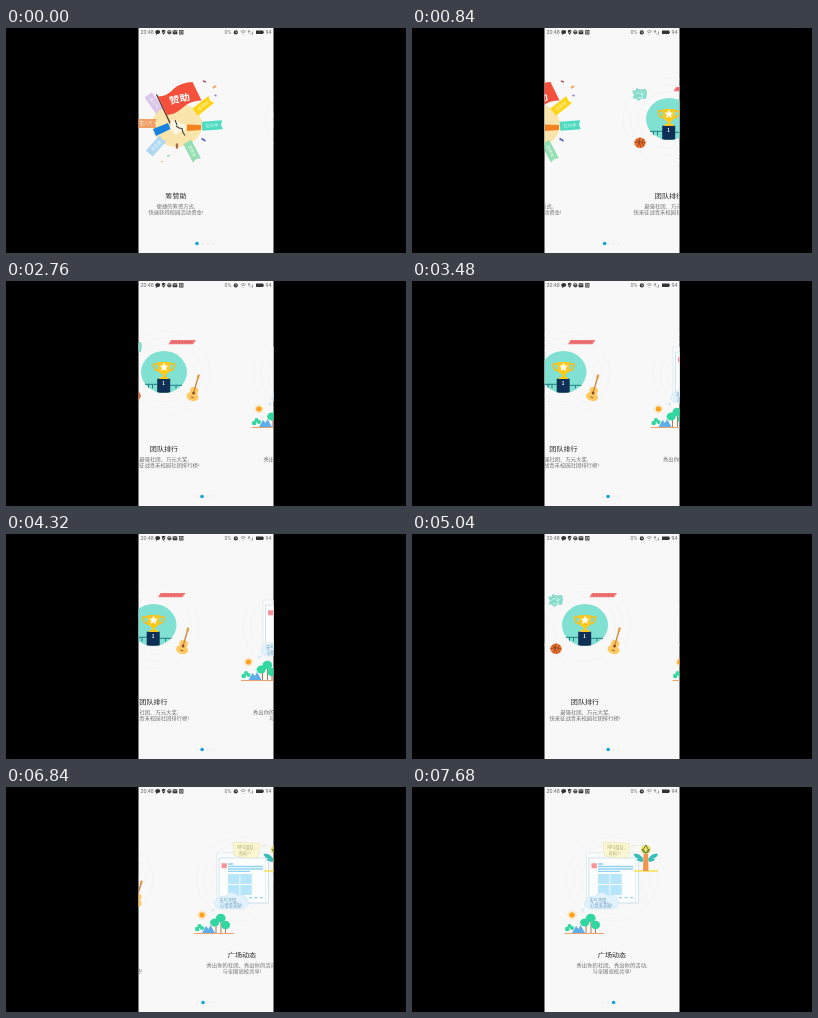
Animation of 400 by 225 pixels, one loop 8000 ms. Source, as an HTML page:

```html
<!DOCTYPE html>
<html lang="zh-CN">
<head>
<meta charset="utf-8">
<title>App intro pages</title>
<style>
  html, body { margin: 0; width: 100%; height: 100%; overflow: hidden; background: #000; }
  svg { display: block; width: 100vw; height: 100vh; }
  text { font-family: "Noto Sans CJK SC", "Noto Sans CJK", "Noto Sans", sans-serif; text-anchor: middle; }
  /* the screen is wider than its native aspect, so type sits low */
  .title, .line { transform: scaleY(.84); transform-box: fill-box; transform-origin: 50% 58%; }
  .title { font-size: 7.1px; font-weight: 500; fill: #222; }
  .line { font-size: 5.35px; fill: #6c6c6c; }
  .bar text { font-family: Roboto, sans-serif; font-size: 5.3px; fill: #666; }
  .ring { fill: none; stroke: #f1f1f1; stroke-width: .6; stroke-dasharray: 9 1.5; }
  .tag { font-size: 4.4px; fill: #fff; opacity: .8; }
</style>
</head>
<body>
<svg viewBox="0 0 400 225">
  <defs>
    <clipPath id="screen"><rect x="132.5" width="135" height="225"/></clipPath>
  </defs>
  <rect width="400" height="225"/>
  <g clip-path="url(#screen)">
    <rect x="130" width="140" height="225" fill="#f8f8f8"/>
    <g id="pages">

      <!-- sponsorship -->
      <g class="page">
        <ellipse cx="201" cy="97" rx="25" ry="22" fill="#fae5ad"/>
        <g id="tags"></g>
        <path d="M201 115.500v5" stroke="#a66a45" stroke-width="2.300"/>
        <path d="M180.800 67L195 97" stroke="#5b3a34" stroke-width="1.400" stroke-linecap="round"/>
        <path d="M182 68.500q9 0 16-8 8-6.500 18.500-6.500l9 18.500q-11 0-18 6.500-7 7-16.500 8z" fill="#f4503b"/>
        <text transform="translate(204.300 74) rotate(-12) scale(1 .86)" font-size="10.500" font-weight="700" fill="#fff">赞助</text>
        <path d="M177 101l15-6 2.500 6-14.500 7z" fill="#1683e0"/>
        <path d="M211 96.500l14 .5v5l-14 1z" fill="#f58220"/>
        <path d="M194 95l5-4 4 4 7 2v5l-7 2-3 3-5-5z" fill="#fdf6e3"/>
        <path d="M199 92l2 5M200 98l3 2 3 .5 1 4 2 3" fill="none" stroke="#443a36" stroke-width="1.100"/>
        <g stroke-width="1.700">
          <path d="M225.500 110.500l4 2.500" stroke="#5a62c8"/>
          <path d="M227 53l3 1" stroke="#b0505d"/>
          <path d="M237 60l3-2" stroke="#f39a55"/>
          <path d="M238.500 67l2 1" stroke="#9b83dc"/>
          <path d="M191 128l3-.5" stroke="#a8d9b4"/>
          <path d="M185 133.500l2 0" stroke="#e7c59a"/>
        </g>
        <text class="title" x="200" y="170">筹赞助</text>
        <text class="line" x="200" y="180">便捷的筹资方式,</text>
        <text class="line" x="200" y="186.100">快速获得校园活动资金!</text>
      </g>

      <!-- ranking -->
      <g class="page">
        <g class="rings"></g>
        <ellipse cx="200" cy="91" rx="23" ry="21" fill="#80e0d1"/>
        <path d="M181 103.300h12.500M206 104.300h12M184.500 103.300v3.500M188.500 103.300v4M212 104.300v3" fill="none" stroke="#16747d" stroke-width=".9"/>
        <path d="M193.200 97.800h13v13.500q-6.500 1-13 0z" fill="#102f55"/>
        <text x="199.700" y="104.300" font-size="4.500" font-weight="700" fill="#fff">1</text>
        <path d="M194.500 83h-5q0 7 6.500 7M205.500 83h5q0 7-6.500 7" fill="none" stroke="#fbbd16" stroke-width="1.700"/>
        <path d="M194 81h12v5q0 6-4.500 7.500v2.500h3v2h-9v-2h3v-2.500q-4.500-1.500-4.500-7.500z" fill="#ffc91c"/>
        <path d="M200 81.500l1.300 2.900 3 .3-2.200 2.100.6 3.100-2.700-1.600-2.700 1.600.6-3.100-2.200-2.100 3-.3z" fill="#fff"/>
        <path d="M163 62.500l3 .5 1.500-3 3.500 1.500 6-.5 1 4-1 6-4.500-.5-3 2.500-3-2.500h-3l1.500-3.500z" fill="#86dccb"/>
        <path d="M166 67l3-3 3 3 4-3M168 70l6-1M172 63l2 5" stroke="#d4f4ec" stroke-width=".8" fill="none"/>
        <path d="M207 59h25l-3 4.200h-24.500z" fill="#f17777"/>
        <path d="M208 61.200h20" stroke="#d9555f" stroke-width="1" stroke-dasharray="2 1"/>
        <ellipse cx="171" cy="114.700" rx="5.700" ry="5.200" fill="#ec7430"/>
        <path d="M165.500 114.500q6-2 11 .5M171 109.500q-2 5 1 10M167.500 111q4 3 1 8M175 111q-4 4 0 7" fill="none" stroke="#7e3822" stroke-width=".7"/>
        <g transform="translate(229.300 113) rotate(16)">
          <path d="M-3.500-6q3.500-2 7 0 1.500 3 0 5 3 2 2.500 4.500-1 3.500-6 3.500t-6-3.500q-.5-2.500 2.500-4.500-1.500-2 0-5z" fill="#ffc860"/>
          <path d="M0 0v-20" stroke="#c98a45" stroke-width="1.400"/>
          <path d="M0-16v-4" stroke="#e59c43" stroke-width="2.200"/>
          <circle cy="-1" r="1.400" fill="#874b2b"/>
          <path d="M-1.500 3.500h3" stroke="#874b2b" stroke-width=".8"/>
        </g>
        <text class="title" x="200" y="170">团队排行</text>
        <text class="line" x="200" y="180">最强社团、万元大奖,</text>
        <text class="line" x="200" y="186.100">快来征战青禾校园社团排行榜!</text>
      </g>

      <!-- square -->
      <g class="page">
        <g class="rings"></g>
        <path d="M174.500 66h49v50h-49z" fill="#f9fbfc" stroke="#dfe7ec" stroke-width=".7"/>
        <path d="M177 71h49.500v45h-49.500z" fill="#fcfdfe" stroke="#c6dcea" stroke-width=".8"/>
        <path d="M223.500 71v45" stroke="#d9e5ed" stroke-width=".6"/>
        <path d="M179.500 76.200h5.300v5h-5.300z" fill="#f69499"/>
        <path d="M186 77h5" stroke="#8fcdef" stroke-width="1.300"/>
        <path d="M186 79.500h35M186 82h35M186 84.300h22" stroke="#91d3f3" stroke-width="1.300"/>
        <path d="M186 87h11.500v10h-11.500zM198.300 87h11.500v10h-11.500zM186 98h11.500v10h-11.500zM198.300 98h11.500v10h-11.500z" fill="#b7e6fb"/>
        <path d="M207 110.700h15" stroke="#91d3f3" stroke-width="1.200" stroke-dasharray="3 2.500"/>
        <path d="M191 55l26.500 1.500-1 14-10 .5-14-2z" fill="#fbf6d2" stroke="#e7dfa8" stroke-width=".5"/>
        <g font-size="4.200" fill="#a9b06a">
          <text x="204" y="62.300">RPG组队,</text>
          <text x="203" y="68">有吗? !</text>
        </g>
        <path d="M219 60q3-3 6-1" fill="none" stroke="#e2dfb5" stroke-width=".7"/>
        <path d="M175 121q-5-4 0-9 5-4 9-3 5-7 11-1 9-1 11 5 2 6-5 9h-22z" fill="#e1f2fc" stroke="#c2e1f3" stroke-width=".5"/>
        <circle cx="171" cy="123" r="1.600" fill="#d6ecf8"/>
        <g font-size="4.200" fill="#6798b8">
          <text x="186.500" y="115">天气不错,</text>
          <text x="189.500" y="120.300">心情美美哒!</text>
        </g>
        <path d="M222 84h24" stroke="#f8e04f" stroke-width="1.300"/>
        <path d="M221.500 67q6-1 10 5l-1 3q-6-1-6-3h3q-5-1-6-5zM246 67q-6-1-10 5l1 3q6-1 6-3h-3q5-1 6-5z" fill="#36bdb5"/>
        <path d="M231.500 67h4.500l.5 17h-5.500z" fill="#f0954f"/>
        <ellipse cx="233.800" cy="62.500" rx="5" ry="4.500" fill="#eee46b"/>
        <path d="M233.800 58l2.500 4.500-2.500 4-2.500-4zM230 62l2 4M237.500 62l-2 4" fill="none" stroke="#61783b" stroke-width="1"/>
        <path d="M152.500 146.500h39.500" stroke="#e9a269" stroke-width="1.200"/>
        <circle cx="160" cy="128" r="4" fill="none" stroke="#ffcf78" stroke-width="1" stroke-dasharray="1 1"/>
        <circle cx="160" cy="128" r="2.800" fill="#ffa41c"/>
        <path d="M160 146l4-7 2.500 3 2-4 4.500 8z" fill="#5daeea"/>
        <path d="M174 136v10M179 133v13M183.500 139v7" stroke="#ad7951" stroke-width="1"/>
        <g fill="#32d6a0">
          <ellipse cx="172.700" cy="135.500" rx="4.600" ry="4"/>
          <ellipse cx="178.800" cy="131" rx="4.900" ry="4.300"/>
          <ellipse cx="183.500" cy="138" rx="4.600" ry="4.200"/>
          <circle cx="155.200" cy="142" r="2.300"/>
          <circle cx="157.500" cy="139" r="2"/>
          <circle cx="160" cy="141" r="2"/>
        </g>
        <text class="title" x="200" y="170">广场动态</text>
        <text class="line" x="200" y="180">秀出你的社团、秀出你的活动,</text>
        <text class="line" x="200" y="186.100">与全国高校共享!</text>
      </g>
    </g>

    <g fill="#f1f1f1">
      <circle cx="191" cy="215.500" r="1.500"/>
      <circle cx="196.300" cy="215.500" r="1.500"/>
      <circle cx="201.600" cy="215.500" r="1.500"/>
      <circle cx="206.900" cy="215.500" r="1.500"/>
    </g>
    <circle id="dot" cy="215.500" r="1.800" fill="#12a3dc"/>

    <g class="bar">
      <text x="141.200" y="6.200">20:48</text>
      <g fill="#333">
        <path d="M149.200 4q0-2 2.500-2t2.500 2-2.500 2l-2 1 .5-1.500q-1-.5-1-1.500z"/>
        <path d="M155.700 2.500l1.900-.7 1.900.7q0 3-1.900 4.200-1.900-1.200-1.900-4.200z"/>
        <path d="M166.700 2.200h4.600v4h-4.600z"/>
        <path d="M173.200 1.900h4.200v4.600h-4.200z"/>
        <circle cx="229.800" cy="4.400" r="2.100"/>
        <path d="M250 2.600h7.200v3.500h-7.200z"/>
        <path d="M257.200 3.500h.8v1.600h-.8z"/>
      </g>
      <circle cx="163.300" cy="4.200" r="1.800" fill="#aaa" stroke="#333" stroke-width=".7"/>
      <path d="M161.600 4.200h3.400v1.300h-2.800z" fill="#333"/>
      <path d="M166.800 2.500l2.200 1.800 2.200-1.800M174.300 3h2v2.300h-2zM156.700 4l.8 1 1.200-1.700M229.800 3.200v1.400h1.100" fill="none" stroke="#f8f8f8" stroke-width=".6"/>
      <path d="M234.700 3.500q2.500-2 5 0M235.700 4.800q1.500-1.200 3 0M237.200 6v.7M242 4l1-1.500 1 1.500M243 2.500v3M245 6.500v-1M246.500 6.500v-3" fill="none" stroke="#777" stroke-width=".7"/>
      <text x="222" y="6.200">0%</text>
      <text x="262.500" y="6.200">94</text>
    </g>
  </g>
</svg>
<script>
  const LOOP = 8000, STEP = 120, WIDTH = 135;

  // [ms, scroll in px]
  const scrollKeys = [
    [0, 30], [240, 46], [720, 46], [840, 78], [960, 78], [1080, 102],
    [1200, 119], [1320, 128], [1440, 132.3], [1680, 135], [1920, 137],
    [2280, 152], [2640, 173], [2760, 177], [3240, 182], [3720, 185], [3840, 185],
    [4320, 187.5], [4680, 184], [4920, 172], [5160, 152], [5400, 138.5],
    [5640, 135.6], [6360, 138], [6480, 153], [6600, 180], [6720, 210],
    [6840, 234], [6960, 250], [7080, 260], [7200, 266], [7320, 268.5],
    [7560, 269.7], [7680, 270]
  ];
  // [ms, dot centre]
  const dotKeys = [
    [0, 191], [720, 191], [1080, 196], [6720, 196.2], [6840, 197], [7080, 201], [7320, 201.6]
  ];
  // x, y, angle, fill, label
  const tags = [
    [178, 75, 55, "#d9c6e8", "造人气"],
    [227, 78, -38, "#ffd415", "找场地"],
    [170, 95.5, 0, "#f0a066", "拿人气"],
    [236, 97.5, -4, "#4edbc1", "拉伙伴"],
    [180, 118, -48, "#add8ef", "寻资源"],
    [216, 123, 62, "#93dfb1", "求物资"]
  ];

  document.getElementById("tags").innerHTML = tags.map(([x, y, angle, fill, label]) =>
    `<g transform="translate(${x} ${y}) rotate(${angle})">
      <path d="M-10-4.500h20.500l-1.500 4.500 1.500 4.500h-20.500z" fill="${fill}"/>
      <text class="tag" y="1.600">${label}</text>
    </g>`).join("");

  document.querySelectorAll(".rings").forEach(g => {
    g.innerHTML = [31, 38, 45.5].map(r =>
      `<ellipse class="ring" cx="200" cy="92" rx="${r}" ry="${r * 0.92}"/>`).join("");
  });

  document.querySelectorAll(".page").forEach((page, i) =>
    page.setAttribute("transform", `translate(${i * WIDTH} 0)`));

  function valueAt(keys, time) {
    const next = keys.findIndex(([ms]) => ms > time);
    if (next < 0) return keys[keys.length - 1][1];
    const [t0, a] = keys[next - 1], [t1, b] = keys[next];
    return a + (b - a) * (time - t0) / (t1 - t0);
  }

  const pages = document.getElementById("pages");
  const dot = document.getElementById("dot");
  const start = performance.now();

  function draw() {
    const elapsed = Math.max(0, performance.now() - start) % LOOP;
    const time = Math.floor(elapsed / STEP) * STEP;
    pages.setAttribute("transform", `translate(${-valueAt(scrollKeys, time)} 0)`);
    dot.setAttribute("cx", valueAt(dotKeys, time));
    requestAnimationFrame(draw);
  }
  draw();
</script>
</body>
</html>
```
